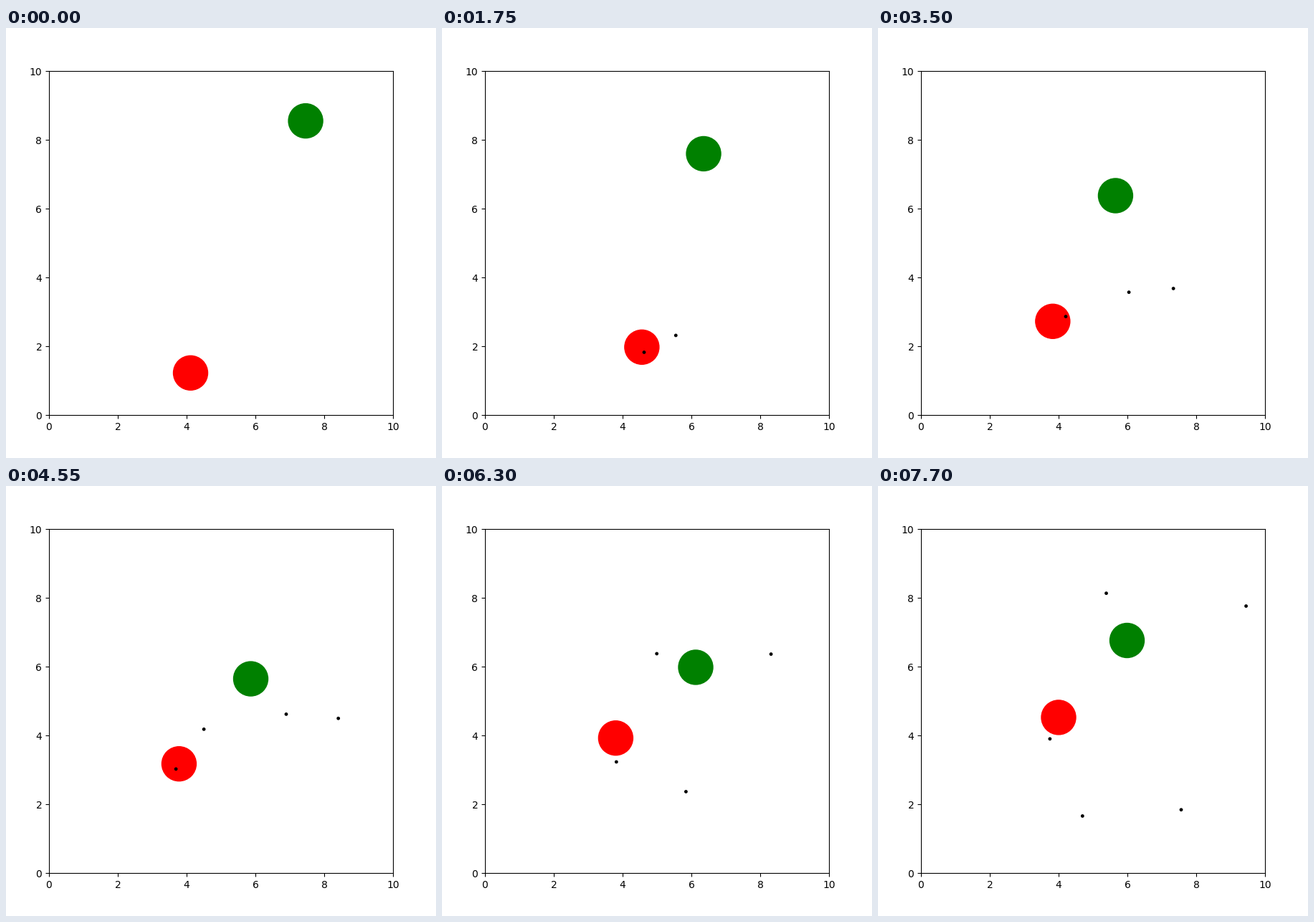
These frames come from a looping animation (600 px wide and 600 px high, 8000 ms). A matplotlib script:

```python
import matplotlib.pyplot as plt
import numpy as np
from matplotlib.animation import FuncAnimation
from matplotlib.patches import Circle

TICK = 50             # ms per drawn frame
FRAMES = 160
HOLD = 7              # drawn frames per simulation step
LAST_STEP = 22
RELOAD = 4            # steps between shots
SHOT_SPEED = 0.45
CLIMB = 0.15          # red's rise per step
AIM = np.radians([37.3, 50.9, 77.4, -17, -60.9, -134])

# Turning points as (step, coordinate), straight runs between them
RED_X = [(0, 4.115), (3, 4.565), (4, 4.625), (5, 4.56), (8, 4.11), (11, 3.69),
         (12, 3.69), (13, 3.78), (15, 3.5), (18, 3.8), (20, 4.06), (22, 4.0)]
GREEN_X = [(0, 7.46), (5, 6.355), (8, 5.82), (10, 5.655),
           (13, 5.865), (18, 6.125), (22, 5.99)]
GREEN_Y = [(0, 8.55), (4, 7.71), (5, 7.595), (13, 5.645),
           (15, 5.56), (17, 5.73), (18, 5.98), (22, 6.76)]


def along(turns, step):
    return np.interp(step, *zip(*turns))


def red_at(step):
    return along(RED_X, step), 1.223 + CLIMB * step


def green_at(step):
    return along(GREEN_X, step), along(GREEN_Y, step)


def shot_at(i, step):
    """A shot leaves from red's place and flies straight."""
    fired = i * RELOAD
    x, y = red_at(fired)
    dist = SHOT_SPEED * (step - fired - 1)
    return x + dist * np.cos(AIM[i]), y + dist * np.sin(AIM[i])


fig = plt.figure(figsize=(6, 6), dpi=100)
ax = fig.add_axes([0.1, 0.1, 0.8, 0.8])
ax.set_xlim(0, 10)
ax.set_ylim(0, 10)

red = ax.add_patch(Circle(red_at(0), 0.5, color="red"))
green = ax.add_patch(Circle(green_at(0), 0.5, color="green"))
shots = [ax.add_patch(Circle((0, 0), 0.05, fc="black", lw=0, zorder=2))
         for _ in AIM]


def update(frame):
    step = min(frame // HOLD, LAST_STEP)
    red.center = red_at(step)
    green.center = green_at(step)
    for i, shot in enumerate(shots):
        shot.set_visible(step > i * RELOAD)
        shot.center = shot_at(i, step)
    return red, green, *shots


anim = FuncAnimation(fig, update, frames=FRAMES, interval=TICK,
                     repeat=True, repeat_delay=0)
plt.show()
```
